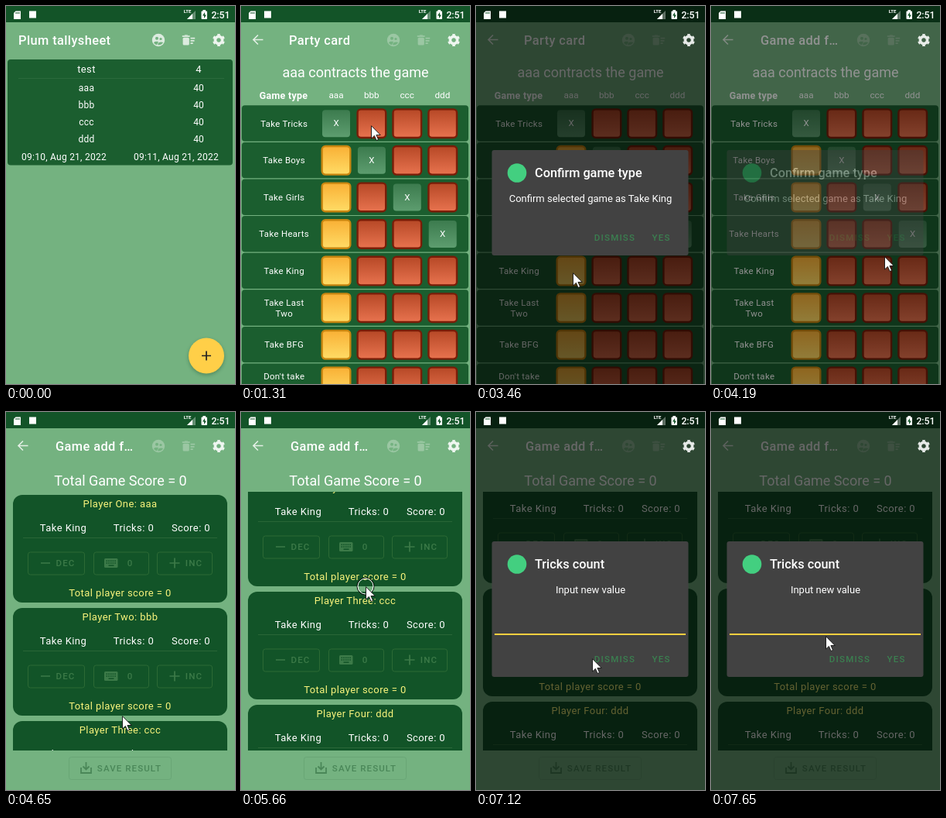
Write an HTML page that moves like this. It is 296 px wide and 488 px high and loops after 7990 ms.

```html
<!DOCTYPE html>
<html lang="en">
<head>
<meta charset="utf-8">
<title>Score keeper demo</title>
<style>
  html, body { margin: 0; width: 100%; height: 100%; overflow: hidden; background: #74b280; }
  svg { display: block; width: 296px; height: 488px; }
  text { font-family: Roboto, "Noto Sans", sans-serif; fill: #fff; white-space: pre; }
  .med { font-weight: 500; }
  .bold { font-weight: 700; }
  .yellow { fill: #f9f47c; }
  .dec { fill: #3c7a48; }
  .save { fill: #4a8758; }
  .act { fill: #3b7f50; }
</style>
</head>
<body>
<svg id="stage" viewBox="0 0 296 488" xmlns="http://www.w3.org/2000/svg"></svg>
<script>
const LOOP = 7990, STEP = 66.73;
const BACK = '#74b280', BAR = '#135428', CARD = '#1b5e2f', PANEL = '#125428';
const NAMES = ['aaa', 'bbb', 'ccc', 'ddd'];

// y is the middle of the capitals; baselines sit on whole pixels
function text(x, y, str, size, { ls = 0, at = 'middle', cls = '' } = {}) {
  return `<text x="${x}" y="${Math.floor(y + size * .36)}" font-size="${size}" letter-spacing="${ls}" text-anchor="${at}" class="${cls}">${str}</text>`;
}
const rect = (x, y, w, h, r, fill, more = '') =>
  `<rect x="${x}" y="${y}" width="${w}" height="${h}" rx="${r}" fill="${fill}" ${more}/>`;
const line = (d, color, width = 1.7, more = '') =>
  `<path d="${d}" fill="none" stroke="${color}" stroke-width="${width}" ${more}/>`;
const disc = (x, y, r, fill, more = '') => `<circle cx="${x}" cy="${y}" r="${r}" fill="${fill}" ${more}/>`;
const group = (id, body, more = '') => `<g id="${id}" ${more}>${body}</g>`;
const at = (x, y, body) => `<g transform="translate(${x} ${y})">${body}</g>`;
const grad = (id, a, b) =>
  `<linearGradient id="${id}" x2="0" y2="1"><stop stop-color="${a}"/><stop offset="1" stop-color="${b}"/></linearGradient>`;

function statusIcons() {
  return '<path d="M12.5 6.5H19V17H10V9z" fill="#fff"/>' + line('M13 8v2M15 8v2M17 8v2', BAR, 1) +
    rect(30, 6.5, 9, 9, 0, '#fff') +
    text(234.5, 6.9, 'LTE', 6, { cls: 'bold' }) +
    '<path d="M234 17 245 6V17z" fill="#fff" opacity=".35"/><path d="M234 17 241 10V17z" fill="#fff"/>' +
    rect(252.5, 6.5, 7.5, 10.5, 1, '#fff') + rect(254.5, 5, 3.5, 2, 0, '#fff') +
    `<path d="M257 8 254 12.4h2V16l3-4.6h-2z" fill="${BAR}"/>` +
    text(277.5, 11.6, '2:51', 12.3, { cls: 'med' });
}

const people = disc(0, 0, 8.2, '#fff') + disc(-2, -2.3, 2, BACK) + disc(3, -1.5, 1.6, BACK) +
  `<path d="M-6 3.2Q-4.800 1.300 0 1.900L-2 6.300Q-5 5.500-6 3.200zM-.6 3.900Q3 1.500 6.200 3Q4 6.500-.6 6.600z" fill="${BACK}"/>`;
const sweep = rect(-7.4, -3.2, 8.2, 9.8, 1.5, '#fff') + rect(-8.2, -5.8, 9.8, 1.7, 0, '#fff') + rect(-5.2, -6.6, 4, 1, 0, '#fff') +
  line('M2.500-2.400h5.700M2.500 .8h5M2.500 4.100h3.200', '#fff');
// A thick ring with six teeth
const gear = '<g fill="none" stroke="#fff" opacity=".88"><circle r="4.6" stroke-width="3.6"/>' +
  '<circle r="6.8" stroke-width="2.4" pathLength="12" stroke-dasharray="1 1" stroke-dashoffset="-.5"/></g>';

function home() {
  const row = (y, a, b, size, ls) => text(104, y, a, size, { ls }) + text(249, y, b, size);
  const date = (x, str) => text(x, 195, str, 12, { ls: .25 });
  return rect(2, 69, 291, 136.5, 4, CARD) + row(82, 'test', '4', 13, .4) + rect(16, 93, 266, 1, 0, '#2b6a3c') +
    NAMES.map((n, i) => row(106 + 22 * i, n, '40', 12, .25)).join('') +
    date(75, '09:10, Aug 21, 2022') + date(220, '09:11, Aug 21, 2022') +
    disc(259, 453.5, 23.5, '#23502f', 'opacity=".35" filter="url(#soft)"') + disc(259, 451.5, 23, '#ffcf48') +
    line('M253 451.500h12M259 445.500v12', '#222');
}

function tableHead() {
  return text(148, 86, 'aaa contracts the game', 18) + text(55, 116, 'Game type', 12.5, { ls: .25, cls: 'bold' }) +
    NAMES.map((n, i) => text(123 + 45.8 * i, 115.5, n, 11.7)).join('');
}

function cell(x, y, kind) {
  if (kind === 'done') return rect(x - 18, y - 17.5, 36, 35, 4, 'url(#done)') + text(x, y, 'X', 11.5);
  const edge = kind === 'own' ? '#c98610' : '#7a1d08';
  return rect(x - 18.3, y - 18.3, 36.6, 36.6, 4.5, `url(#${kind})`, `stroke="${edge}" stroke-width="2.4"`);
}

function tableRows() {
  const games = ['Take Tricks', 'Take Boys', 'Take Girls', 'Take Hearts', 'Take King', 'Take Last|Two', 'Take BFG', "Don't take|"];
  return games.map((g, r) => {
    const y = 152 + 47.6 * r, lines = g.split('|');
    return rect(1, y - 23.7, 293, 46.4, 4, CARD) +
      lines.map((l, i) => text(55.7, y + 14 * (i - (lines.length - 1) / 2), l, 11.5, { ls: .28 })).join('') +
      NAMES.map((_, c) => cell(123 + 45.9 * c, y - .3, c === r ? 'done' : c ? 'other' : 'own')).join('');
  }).join('');
}

function player(i) {
  const top = 107 + 146 * i, mid = top + 88, ink = '#3c7a48';
  const label = (x, y, str, cls) => text(x, top + y, str, 13, { ls: .42, cls });
  const button = (x, w, tx, str) => rect(x, top + 74, w, 29, 3, 'none', 'stroke="#2c6a35"') +
    text(tx, mid, str, 11.5, { ls: 1.2, cls: 'dec med' });
  return rect(9, top, 277, 139, 12, PANEL) +
    label(147.5, 12, `Player ${['One', 'Two', 'Three', 'Four'][i]}: ${NAMES[i]}`, 'yellow') +
    label(74, 43, 'Take King') + label(165, 43, 'Tricks: 0') + label(239, 43, 'Score: 0') +
    rect(22, top + 55, 251, 1, 0, '#296637') +
    button(28.5, 73, 77, 'DEC') + button(113.5, 71, 160.5, '0') + button(195.5, 71, 243, 'INC') +
    at(0, mid, line('M45 0h12M211.500 0h13M218-6.500v13', ink) + rect(127, -6, 17.5, 12, 1.5, ink) +
      line('M129.500-2.800h13M129.500 0h13', PANEL, 1.5, 'stroke-dasharray="1.6 1.1"') + line('M132.500 3.200h7', PANEL, 1.5)) +
    label(147.5, 127, 'Total player score = 0', 'yellow');
}

function game() {
  return text(148, 89, 'Total Game Score = 0', 18) +
    '<g clip-path="url(#list)">' + group('cards', NAMES.map((_, i) => player(i)).join('')) + '</g>' +
    rect(81.5, 445.5, 132, 29, 3, 'none', 'stroke="#69a675"') +
    line('M97 459v7h13v-7M103.500 452v9M99.500 457.500l4 4 4-4', '#4a8758', 1.8) +
    text(159.5, 460, 'SAVE RESULT', 11.5, { ls: 1.1, cls: 'save med' });
}

function dialog(top, height, title, message) {
  const action = (x, str) => text(x, top + height - 22.5, str, 11.5, { ls: 1.2, cls: 'act med' });
  return rect(20.5, top, 254, height, 3, '#424242') + disc(53, top + 29.5, 12.3, '#43cf80') +
    text(76, top + 30, title, 16.3, { at: 'start', cls: 'med' }) + text(148, top + 62.5, message, 13) +
    action(179.5, 'DISMISS') + action(239.5, 'YES');
}

const heading = (id, x, str) => group(id, text(x, 44.5, str, 16.4, { ls: .4, at: 'start', cls: 'med' }));

document.getElementById('stage').innerHTML =
  '<defs>' + grad('own', '#f9b035', '#ffdc66') + grad('other', '#b64826', '#e8734f') + grad('done', '#3c7b4e', '#5d9d6f') +
  '<clipPath id="list"><rect y="103" width="296" height="334"/></clipPath>' +
  '<filter id="soft"><feGaussianBlur stdDeviation="2"/></filter></defs>' +
  rect(0, 0, 296, 488, 0, BACK) + rect(0, 0, 296, 21, 0, BAR) +
  group('tools', at(197, 44, people) + at(236, 44, sweep)) +
  group('back', at(22, 43.5, line('M6.500 0h-12M0-6l-6 6 6 6', '#fff', 1.6))) +
  heading('homeTitle', 16, 'Plum tallysheet') + heading('partyTitle', 62, 'Party card') + heading('gameTitle', 64, 'Game add f…') +
  group('home', home()) +
  group('party', tableHead() + group('rows', tableRows())) +
  group('game', game()) +
  '<rect id="dim" width="296" height="488"/>' +
  at(275, 44, gear) + statusIcons() +
  group('confirm', dialog(186, 136, 'Confirm game type', 'Confirm selected game as Take King')) +
  group('input', dialog(167, 175, 'Tricks count', 'Input new value') + rect(24, 286, 247, 2, 0, '#ffcf3f')) +
  group('pointer',
    group('ring', '<circle r="11" stroke="#000"/><circle r="10" stroke="#fff"/>', 'fill="none"') +
    '<path d="M.5.7V17l3.900-3.600 2.700 6.100 2.500-1.100-2.700-5.900h5.300z" fill="#fff" stroke="#111" stroke-width=".9"/>');

// Pointer moves: from ms, to ms, x, y
const ENTRY = [226, 433], DRAG = [4930, 5720];
const MOVES = [
  [310, 640, 168, 154], [1445, 2245, 122, 345], [3400, 3900, 238, 301], [4046, 4180, 224, 323],
  [4180, 4640, 150, 392], [...DRAG, 161, 221], [6050, 6360, 151, 325], [6950, 7550, 148, 289]
];
const PRESSES = [[770, 840], [2500, 2640], [3905, 4040], [4980, 5850], [6570, 6640]];

const ramp = (t, a, b) => Math.min(1, Math.max(0, (t - a) / (b - a)));
const ease = (t, a, b) => { const p = ramp(t, a, b); return p * p * (3 - 2 * p); };

function pointerAt(t) {
  let [x, y] = ENTRY;
  for (const [a, b, tx, ty] of MOVES) {
    const p = ease(t, a, b);
    x += (tx - x) * p;
    y += (ty - y) * p;
  }
  return [Math.round(x), Math.round(y)];
}

const $ = id => document.getElementById(id);
const fade = (id, v) => $(id).setAttribute('opacity', +v);
const move = (id, x, y) => $(id).setAttribute('transform', `translate(${x} ${y})`);

function draw(ms) {
  const t = 310 + Math.floor((ms % LOOP - 300) / STEP) * STEP;
  const atHome = t < 1040, atGame = t > 4175, swap = ramp(t, 4250, 4440);
  fade('homeTitle', atHome);
  fade('partyTitle', !atHome && !atGame);
  fade('gameTitle', atGame);
  fade('back', atHome ? 0 : .8);
  fade('tools', atHome ? .75 : .28);
  fade('home', atHome);
  fade('party', atHome ? 0 : 1 - swap);
  fade('rows', ramp(t, 1180, 1300));
  fade('game', swap);
  move('cards', 0, -Math.round(171 * ease(t, ...DRAG)));
  fade('dim', .6 * (ramp(t, 2920, 3115) - ramp(t, 4113, 4350) + ramp(t, 6790, 6985)));
  fade('confirm', ramp(t, 2910, 3050) - ramp(t, 4090, 4235));
  fade('input', ramp(t, 6782, 6920));
  fade('pointer', t > 305);
  fade('ring', PRESSES.some(([a, b]) => t >= a && t < b));
  move('pointer', ...pointerAt(t));
}

const start = performance.now();
function tick(now) {
  draw(Math.max(0, now - start));
  requestAnimationFrame(tick);
}
draw(0);
requestAnimationFrame(tick);
</script>
</body>
</html>
```
